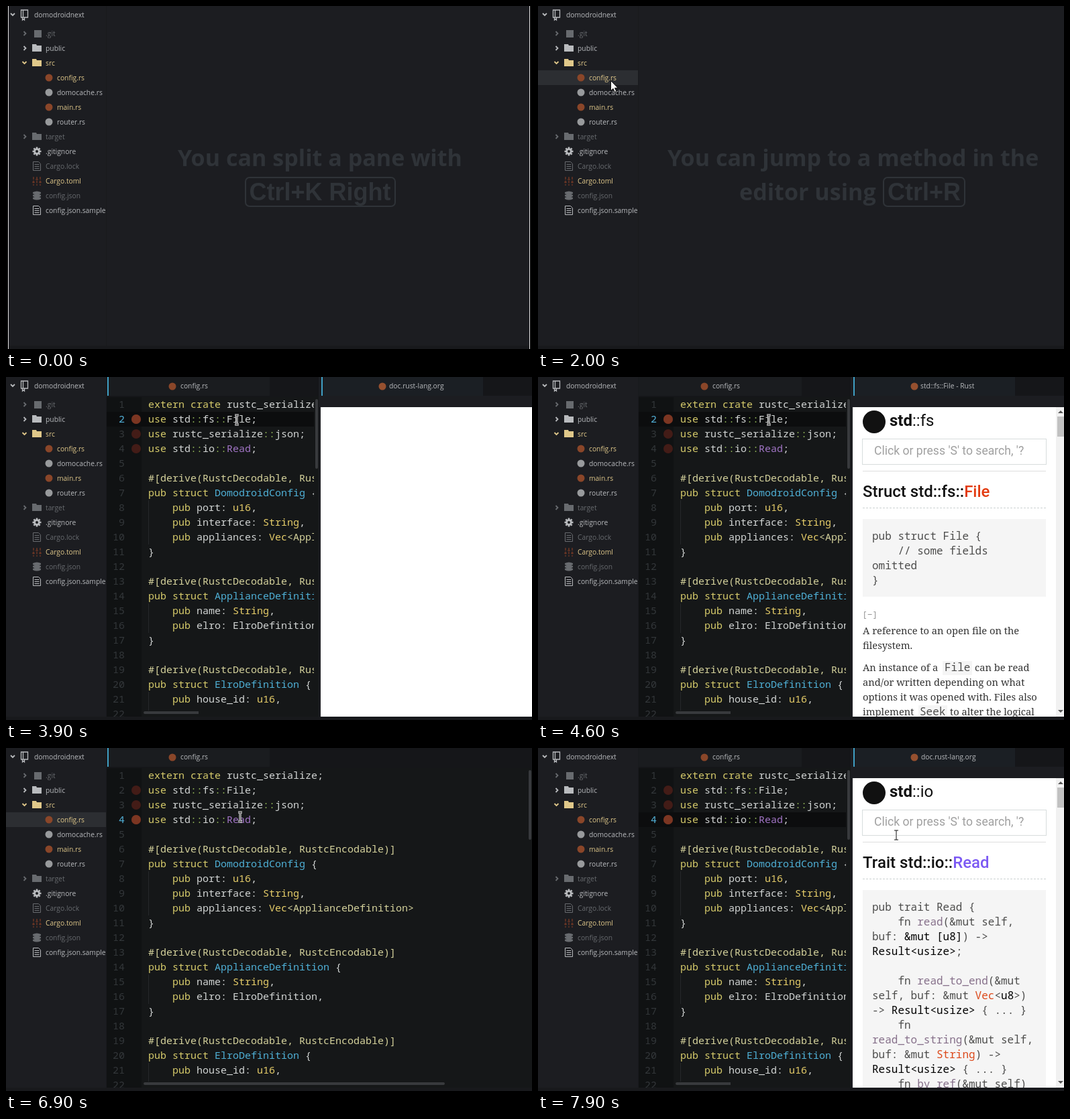
Write an HTML page that moves like this. It is 784 by 512 pixels and loops after 8 s.

```html
<!DOCTYPE html>
<html lang="en">
<head>
<meta charset="utf-8">
<title>Editor with documentation pane</title>
<style>
html, body { margin: 0; width: 100%; height: 100%; overflow: hidden; background: #1c1d21; }
svg { display: block; width: 784px; height: 512px; }
text { white-space: pre; font: 10.3px "Open Sans", sans-serif; fill: #b9bbbe; }
.dim { fill: #686b6f; }
.mod { fill: #e0c88a; }
.tip text { font: 700 34.1px "Open Sans", sans-serif; fill: #2f3338; }
.tip .key { font: 700 36px "Liberation Sans", Arial, sans-serif; }
.tip rect { fill: none; stroke: #2f3338; stroke-width: 2; }
.code text { font: 15px "Noto Sans Mono", monospace; fill: #d2d5d4; }
.code .num { fill: #33373a; text-anchor: end; }
.code .lit .num { fill: #4ba9d0; }
.attr { fill: #d5d29c; } .word { fill: #d6cb6b; } .sep { fill: #8fb356; }
.type { fill: #e6cd69; } .name { fill: #4fb0d6; } .trait { fill: #a074c4; }
.page text { font: 14.7px "Noto Serif", serif; fill: #333; }
.page .mono { font: 16px "Noto Sans Mono", monospace; fill: #4d4d4c; }
.page .fold { font: 13px "Noto Sans Mono", monospace; fill: #999; }
.page .head { font: 24px Roboto, sans-serif; fill: #111; }
.page .title { font: 500 24px Roboto, sans-serif; fill: #111; }
.page .hint { font: 17.6px Roboto, sans-serif; fill: #a0a0a0; }
.b { font-weight: 700; } .k { fill: #000; } .f { fill: #86708a; }
.s { fill: #dc4a1c; } .r { fill: #e33b10; } .t { fill: #7c5af3; }

.cut { animation: 8s step-end infinite; }
#border { animation-name: border; }
#tip1 { animation-name: tip1; }
#tip2 { animation-name: tip2; }
#row { animation-name: row; }
#editor { animation-name: editor; }
#bar { animation-name: bar; }
#active { animation-name: active; }
#lit1 { animation-name: lit1; }
#lit2 { animation-name: lit2; }
#lit4 { animation-name: lit4; }
#split { animation-name: split; }
#blank { animation-name: blank; }
#filePage { animation-name: filePage; }
#readPage { animation-name: readPage; }
#scroll { animation-name: scroll; }
#address { animation-name: address; }
#pageName { animation-name: pageName; }
#close { animation-name: close; }
#arrow { animation-name: arrow; }
#beam { animation-name: beam; }
#mouse { animation: mouse 8s ease-in-out infinite; }

@keyframes border { 0% { opacity: 1 } 1.25%, to { opacity: 0 } }
@keyframes tip1 { 0% { opacity: 1 } 6.25% { opacity: .4 } 8.75% { opacity: .12 } 10%, to { opacity: 0 } }
@keyframes tip2 { 0% { opacity: 0 } 13.75%, to { opacity: 1 } }
@keyframes row { 0% { opacity: 0 } 22.5% { opacity: 1 } 46.25% { opacity: 0 } 75% { opacity: 1 } 87.5%, to { opacity: 0 } }
@keyframes editor { 0% { opacity: 0 } 31.25%, to { opacity: 1 } }
@keyframes bar { 0% { opacity: 1 } 51.25% { opacity: 0 } 75% { opacity: 1 } 90%, to { opacity: 0 } }
@keyframes active {
  0% { transform: none; opacity: 1 }
  43.75% { transform: translateY(22px); opacity: 1 }
  75% { transform: translateY(22px); opacity: 0 }
  87.5%, to { transform: translateY(66px); opacity: 1 }
}
@keyframes lit1 { 0% { opacity: 1 } 43.75%, to { opacity: 0 } }
@keyframes lit2 { 0% { opacity: 0 } 43.75% { opacity: 1 } 85%, to { opacity: 0 } }
@keyframes lit4 { 0% { opacity: 0 } 85%, to { opacity: 1 } }
@keyframes split { 0% { opacity: 0 } 46.25% { opacity: 1 } 75% { opacity: 0 } 87.5%, to { opacity: 1 } }
@keyframes blank { 0% { opacity: 0 } 47.5% { opacity: 1 } 75% { opacity: 0 } 88.75%, to { opacity: 1 } }
@keyframes filePage { 0% { opacity: 0 } 53.75% { opacity: 1 } 75%, to { opacity: 0 } }
@keyframes readPage { 0% { opacity: 0 } 93.75%, to { opacity: 1 } }
@keyframes scroll { 0% { opacity: 0 } 57.5% { opacity: 1 } 75% { opacity: 0 } 93.75%, to { opacity: 1 } }
@keyframes address { 0% { opacity: 1 } 55% { opacity: 0 } 75%, to { opacity: 1 } }
@keyframes pageName { 0% { opacity: 0 } 55% { opacity: 1 } 75%, to { opacity: 0 } }
@keyframes close { 0% { opacity: 0 } 71.25% { opacity: 1 } 75%, to { opacity: 0 } }
@keyframes arrow { 0% { opacity: 0 } 16.25% { opacity: 1 } 33.75% { opacity: 0 } 68.75% { opacity: 1 } 77.5%, to { opacity: 0 } }
@keyframes beam { 0% { opacity: 0 } 33.75% { opacity: 1 } 68.75% { opacity: 0 } 77.5%, to { opacity: 1 } }
@keyframes mouse {
  0%, 16.25% { transform: translate(708px, 262px) }
  24.5%, 30% { transform: translate(108px, 111px) }
  39%, 40% { transform: translate(284px, 75px) }
  43.75%, 62.4% { transform: translate(344px, 64px) }
  62.5%, 65% { transform: translate(346px, 64px) }
  73.5%, 75% { transform: translate(558px, 6px) }
  86%, 91.25% { transform: translate(349px, 103px) }
  98.5%, to { transform: translate(534px, 130px) }
}
</style>
</head>
<body>
<svg viewBox="0 0 784 512" xmlns="http://www.w3.org/2000/svg">
  <rect width="784" height="512" fill="#1c1d21"/>
  <rect class="cut" id="row" y="96" width="150" height="22" fill="#2c2e32"/>
  <g id="tree"></g>
  <rect x="150" width="634" height="512" fill="#1c1d21"/>
  <path d="M149.5 0V508" stroke="#191a1d"/>

  <g class="cut tip" id="tip1">
    <text x="256" y="239">You can split a pane with</text>
    <rect x="357" y="256" width="223" height="43" rx="6"/>
    <text class="key" x="362.5" y="290">Ctrl+K Right</text>
  </g>
  <g class="cut tip" id="tip2">
    <text x="193" y="239">You can jump to a method in the</text>
    <text x="300" y="290">editor using</text>
    <rect x="515" y="256" width="121" height="43" rx="6"/>
    <text class="key" x="521" y="290">Ctrl+R</text>
  </g>

  <g class="cut" id="editor">
    <rect x="150" width="634" height="30" fill="#151619"/>
    <rect x="150" width="243" height="28" fill="#1a1c1f"/>
    <rect class="cut" id="bar" x="151" width="2" height="28" fill="#3f9fc4"/>
    <circle cx="248" cy="14" r="5.5" fill="#8a4629"/>
    <text x="260" y="17">config.rs</text>
    <rect x="150" y="30" width="634" height="477" fill="#151718"/>
    <rect x="150" y="30" width="52" height="477" fill="#101213"/>
    <rect class="cut" id="active" x="150" y="30" width="626" height="22" fill="#0c0d0e"/>
    <g class="code" id="code"></g>
    <g fill="#383a3d">
      <rect x="205" y="499" width="449" height="4" rx="2"/>
      <rect x="779" y="33" width="4" height="104" rx="2"/>
    </g>

    <g class="cut" id="split">
      <rect x="287" y="497" width="173" height="8" fill="#151718"/>
      <rect x="459" y="28" width="8" height="479" fill="#151718"/>
      <rect x="461" y="33" width="4" height="104" rx="2" fill="#383a3d"/>
      <rect x="466" width="318" height="512" fill="#1c1d21"/>
      <rect x="470" width="241" height="28" fill="#1b1f24"/>
      <rect x="711" width="73" height="28" fill="#151619"/>
      <rect x="470" width="2" height="28" fill="#3f9fc4"/>
      <circle cx="561" cy="14" r="5.5" fill="#96502f"/>
      <text class="cut" id="address" x="571" y="17">doc.rust-lang.org</text>
      <text class="cut" id="pageName" x="570" y="17">std::fs::File - Rust</text>
      <path class="cut" id="close" d="M693.5 11l5 5m0-5l-5 5" stroke="#8b8e92" stroke-width="1.6"/>
      <rect class="cut" id="blank" x="469" y="45" width="315" height="462" fill="#fff"/>
      <g class="cut page" id="filePage"></g>
      <g class="cut page" id="readPage"></g>
      <g class="cut" id="scroll">
        <rect x="772" y="45" width="12" height="462" fill="#f1f1f1"/>
        <rect x="774" y="59" width="10" height="30" fill="#c1c1c1"/>
        <path d="M775 54l4-4 4 4zM775 497l4 4 4-4z" fill="#555"/>
      </g>
    </g>
  </g>

  <rect y="507" width="784" height="5" fill="#18191c"/>
  <g class="cut" id="border">
    <path d="M0 0h3v512h-3zM781 0h3v512h-3z"/>
    <path d="M3.5 0V512M780.5 0V512" stroke="#e4e4e4"/>
  </g>

  <g id="mouse">
    <path class="cut" id="arrow" d="M.5 .5V15.5L4 12.3 6.3 17.5 8.8 16.4 6.5 11.4H11z" fill="#fff" stroke="#111"/>
    <g class="cut" id="beam" fill="none">
      <path d="M-3 -7H3M0 -7V7M-3 7H3" stroke="#fff" stroke-width="3"/>
      <path d="M-3 -7H3M0 -7V7M-3 7H3" stroke="#111"/>
    </g>
  </g>
</svg>
<script>
const byId = id => document.getElementById(id);
const esc = s => s.replace(/&/g, '&amp;').replace(/</g, '&lt;');
// «k word» gives the word class k
const mark = s => esc(s).replace(/«(\w) (.*?)»/g, '<tspan class="$1">$2</tspan>');
const text = (x, y, s, cls = '') => `<text x="${x}" y="${y}" class="${cls}">${mark(s)}</text>`;
const rect = (x, y, w, h, fill) => `<rect x="${x}" y="${y}" width="${w}" height="${h}" fill="${fill}"/>`;
const disc = (x, y, r, fill) => `<circle cx="${x}" cy="${y}" r="${r}" fill="${fill}"/>`;
const line = (d, color, width = 1, dash = 'none') =>
  `<path d="${d}" fill="none" stroke="${color}" stroke-width="${width}" stroke-dasharray="${dash}"/>`;

// Project tree
const tones = { '': '#b9bbbe', dim: '#686b6f', mod: '#e0c88a' };
const chevron = (x, y, open, color) =>
  line(open ? `M${x - 3} ${y - 2}l3 3 3-3` : `M${x - 1} ${y - 3}l3 3-3 3`, color, 1.8);
const icons = {
  book: (y, c) => line(`M22.5 ${y - 7}h10v11h-10zM25.5 ${y - 7}v11M24.5 ${y + 4}v4l1.5-1.5 1.5 1.5v-4`, c, 1.3),
  square: (y, c) => rect(42, y - 5, 11, 11, c),
  folder: (y, c) => `<path d="M39 ${y - 6}h6l1 2h7v9H39z" fill="${c}"/>`,
  rust: (y, c) => disc(64, y, 5.5, c === tones.mod ? '#8a4629' : '#989a9c'),
  gear: (y, c) => line(`M46 ${y - 6.5}v13M39.5 ${y}h13M41.4 ${y - 4.6}l9.2 9.2M50.6 ${y - 4.6}l-9.2 9.2`, c, 2.6)
    + disc(46, y, 4.8, c) + disc(46, y, 2, '#1c1d21'),
  page: (y, c) => line(`M40.5 ${y - 6.5}h8l3 3v10h-11zM42.5 ${y - 2.5}h7M42.5 ${y + .5}h7M42.5 ${y + 3.5}h7`, c),
  sliders: y => line(`M41 ${y - 6}v13M46 ${y - 6}v13M51 ${y - 6}v13`, '#7d3c26', 1.2, '4 1.5')
    + line(`M39 ${y + 2}h4M44 ${y - 2}h4M49 ${y + 2}h4`, '#7d3c26', 1.2),
  disks: (y, c) => [-4, 0, 4].map(d =>
    `<path d="M40 ${y + d - 1}q6-3 12 0v2q-6 3-12 0z" fill="${c}"/>`).join('')
};
const tree = [
  [13, 42, 'domodroidnext', 'book', '', 'open'],
  [41, 59, '.git', 'square', 'dim', 'shut'],
  [63, 59, 'public', 'folder', '', 'shut'],
  [85, 59, 'src', 'folder', 'mod', 'open'],
  [107, 76, 'config.rs', 'rust', 'mod'],
  [129, 76, 'domocache.rs', 'rust', ''],
  [151, 76, 'main.rs', 'rust', 'mod'],
  [173, 76, 'router.rs', 'rust', ''],
  [195, 59, 'target', 'folder', 'dim', 'shut'],
  [217, 59, '.gitignore', 'gear', ''],
  [239, 59, 'Cargo.lock', 'page', 'dim'],
  [261, 59, 'Cargo.toml', 'sliders', 'mod'],
  [283, 59, 'config.json', 'disks', 'dim'],
  [305, 59, 'config.json.sample', 'page', '']
];
byId('tree').innerHTML = tree.map(([y, x, label, icon, tone, fold]) =>
  text(x, y + 4, label, tone) + icons[icon](y, tones[tone]) +
  (fold ? chevron(icon === 'book' ? 10 : 27.5, y, fold === 'open', tones[tone]) : '')).join('');

// Source code
const source = `extern crate rustc_serialize;
use std::fs::File;
use rustc_serialize::json;
use std::io::Read;

#[derive(RustcDecodable, RustcEncodable)]
pub struct DomodroidConfig {
    pub port: u16,
    pub interface: String,
    pub appliances: Vec<ApplianceDefinition>
}

#[derive(RustcDecodable, RustcEncodable)]
pub struct ApplianceDefinition {
    pub name: String,
    pub elro: ElroDefinition,
}

#[derive(RustcDecodable, RustcEncodable)]
pub struct ElroDefinition {
    pub house_id: u16,
`.split('\n');
const tokens = /(?<attr>#\[.*|<.*>)|(?<word>\b(?:extern|crate|use|pub|struct)\b)|(?<sep>::)|(?<type>\b(?:u16|String|Vec)\b)|(?<name>(?<=struct )\w+)|(?<trait>\bRead\b)/g;
const paint = s => s.replace(tokens, (token, ...rest) => {
  const groups = rest[rest.length - 1];
  const kind = Object.keys(groups).find(k => groups[k]);
  return `<tspan class="${kind}">${esc(token)}</tspan>`;
});
const lineY = n => 24 + 22 * n;
const number = n => text(177, lineY(n), String(n), 'num');
const lit = n => `<g class="cut lit" id="lit${n}">${number(n)}${n > 1 ? disc(194, lineY(n) - 5, 7, '#7c3622') : ''}</g>`;
byId('code').innerHTML =
  source.map((s, i) => number(i + 1) + `<text x="212" y="${lineY(i + 1)}">${paint(s)}</text>`).join('') +
  [2, 3, 4].map(n => disc(194, lineY(n) - 5, 7, '#431c17')).join('') +
  [1, 2, 4].map(lit).join('') +
  line('M212.5 184v66M212.5 338v44M212.5 470v28', '#25282a');

// Documentation pages
const page = (module, title, code, preHeight) =>
  disc(501, 67, 17, '#111') +
  text(524, 73, `«b std»::${module}`, 'head') +
  `<rect x="483.5" y="92.5" width="274" height="38" fill="#fff" stroke="#d8dddd"/>` +
  text(501, 116, "Click or press 'S' to search, '?", 'hint') +
  line('M484 140.5H757', '#dedede') +
  text(484, 179, title, 'title') +
  line('M484 195.5H757', '#ccd2d2', 1, '3 2') +
  rect(484, 212, 273, preHeight, '#f5f5f5') +
  code.map((s, i) => text(498, 243 + 22 * i, s, 'mono')).join('');

byId('filePage').innerHTML = page('fs', 'Struct std::fs::«r File»', [
  'pub struct File {',
  '    // some fields',
  'omitted',
  '}'
], 116) +
  rect(603, 424, 44, 21, '#f5f5f5') + rect(567, 490, 43, 21, '#f5f5f5') +
  text(483, 359, '[−]', 'fold') +
  text(484, 384, 'A reference to an open file on the') +
  text(484, 406, 'filesystem.') +
  text(484, 439, 'An instance of a') + text(606, 439, 'File', 'mono') + text(651, 439, 'can be read') +
  text(484, 461, 'and/or written depending on what') +
  text(484, 483, 'options it was opened with. Files also') +
  text(484, 505, 'implement') + text(569, 505, 'Seek', 'mono') + text(614, 505, 'to alter the logical');

byId('readPage').innerHTML = page('io', 'Trait std::io::«t Read»', [
  'pub trait Read {',
  '    fn «f read»(&mut self,',
  'buf: «k &mut [u8]») ->',
  '«k Result<usize>»;',
  '',
  '    fn «f read_to_end»(&mut',
  'self, buf: &mut «s Vec»<«k u8»>)',
  '-> «k Result<usize>» { ... }',
  '    fn',
  '«f read_to_string»(&mut self,',
  'buf: &mut «s String») ->',
  '«k Result<usize>» { ... }',
  '    fn «f by_ref»(&mut self)'
], 295);
</script>
</body>
</html>
```
